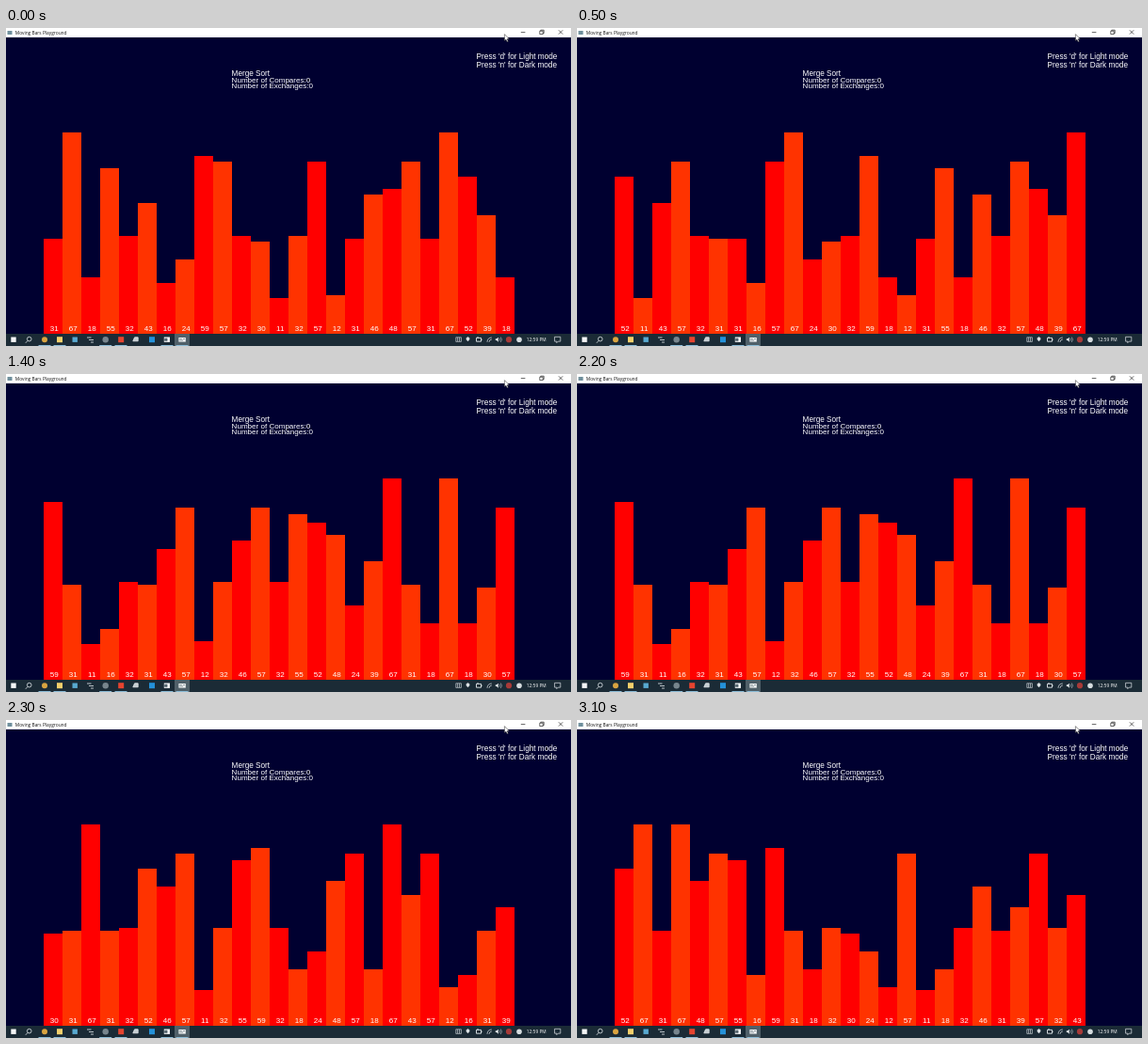
Recreate the animation shown at these times as an HTML page. Size 600 by 338 pixels, loop 3.7 s.

```html
<!DOCTYPE html>
<html lang="en">
<head>
<meta charset="utf-8">
<title>Moving Bars Playground</title>
<style>
  html, body { margin: 0; width: 100%; height: 100%; overflow: hidden; background: #000030; }
  svg { display: block; width: 100vw; height: 100vh; }
  text { white-space: pre; }
  .hud { font: 8.05px "Liberation Sans", Arial, sans-serif; fill: #fff; }
  .ui { font: 4.85px "Open Sans", sans-serif; }
  .line { fill: none; stroke: #e4e9ec; stroke-width: .8; }
</style>
</head>
<body>
<svg id="stage" viewBox="0 0 600 338" preserveAspectRatio="none">
  <rect width="600" height="338" fill="#000030"/>
  <g id="bars"></g>

  <g class="hud">
    <text x="239.6" y="51" font-size="8.2">Merge Sort</text>
    <text x="239.6" y="57.7">Number of Compares:0</text>
    <text x="239.6" y="64">Number of Exchanges:0</text>
    <text x="499.6" y="32.6" style="font-size:8.22px">Press 'd' for Light mode</text>
    <text x="499.6" y="41.8" style="font-size:8.22px">Press 'n' for Dark mode</text>
  </g>

  <!-- title bar -->
  <rect width="600" height="10" fill="#fff"/>
  <rect x="1.5" y="3" width="5" height="4" fill="#6f8f9c"/>
  <text class="ui" x="9.8" y="6.7" fill="#111">Moving Bars Playground</text>
  <g fill="none" stroke="#222" stroke-width=".7">
    <path d="M546.8 4.6h4.6M586.9 2.3l4.3 4.3M591.2 2.3l-4.3 4.3"/>
    <path d="M566.8 3.2h3.4v3.4h-3.4zM567.8 3.2v-1h3.4v3.4h-1"/>
  </g>
  <path d="M529.4 6.6v7l1.6-1.4 1.1 2.5 1.2-.5-1.1-2.5h2.2z" fill="#fff" stroke="#222" stroke-width=".5"/>

  <!-- taskbar -->
  <rect y="325" width="600" height="13" fill="#1b2b36"/>
  <rect x="179" y="325" width="16" height="13" fill="#506069"/>
  <g id="running" fill="#8dbdd8"></g>
  <g id="marks"></g>
  <g class="line">
    <circle cx="24.7" cy="330.6" r="2.3"/>
    <path d="M23 332.4l-2.2 2.4"/>
    <path d="M86 329h4.5M88 331.5h5M90 334h3"/>
    <path d="M134.8 332.8h5.4v-4h-3.6z" fill="#c5cdd1"/>
    <path d="M477.8 328.8h5.6v4.6h-5.6zM479.6 329v4M481.5 329v4" stroke-width=".6"/>
    <path d="M490.5 328v4.5M489 329.2h3v2l-1.5 1.6-1.5-1.6z" stroke-width=".6" fill="#dce2e5"/>
    <path d="M499.5 329.4h5v3.8h-5zM505 330.5v1.6M501 328v1.4" stroke-width=".9"/>
    <path d="M511 333.8a5 5 0 0 1 4.8-4.8M513 333.8a3 3 0 0 1 2.8-2.8" stroke-width=".7"/>
    <path d="M519.8 330.3h1.2l1.8-1.6v5l-1.8-1.6h-1.2z" fill="#e4e9ec" stroke="none"/>
    <path d="M524 329.6q1.5 1.6 0 3.2M525.3 328.5q2.4 2.7 0 5.4" stroke-width=".5"/>
    <path d="M582.6 328.3h6.2v4.8h-2.6l-1.4 1.5v-1.5h-2.2z" stroke-width=".7"/>
  </g>
  <g fill="#f2f4f5">
    <rect x="167.8" y="328.5" width="6.2" height="5.4"/>
    <rect x="183.4" y="329" width="7.4" height="4.6"/>
  </g>
  <path d="M168.5 330h2.6v2.6h-2.6zM184.2 330.5h2.6M188 330.5h2M184.2 332h4" stroke="#53636d" stroke-width=".6" fill="#53636d"/>
  <text class="ui" x="552.8" y="333.1" fill="#fff">12:59 PM</text>
</svg>
<script>
const LOOP = 3700;
const WIDTH = 20, LEFT = 40, FLOOR = 325;
const shuffles = [
  [0, "31 67 18 55 32 43 16 24 59 57 32 30 11 32 57 12 31 46 48 57 31 67 52 39 18"],
  [500, "52 11 43 57 32 31 31 16 57 67 24 30 32 59 18 12 31 55 18 46 32 57 48 39 67"],
  [1400, "59 31 11 16 32 31 43 57 12 32 46 57 32 55 52 48 24 39 67 31 18 67 18 30 57"],
  [2300, "30 31 67 31 32 52 46 57 11 32 55 59 32 18 24 48 57 18 67 43 57 12 16 31 39"],
  [3100, "52 67 31 67 48 57 55 16 59 31 18 32 30 24 12 57 11 18 32 46 31 39 57 32 43"]
];

function add(parent, tag, attrs, text = "") {
  const node = document.createElementNS("http://www.w3.org/2000/svg", tag);
  for (const key in attrs) node.setAttribute(key, attrs[key]);
  node.textContent = text;
  return parent.appendChild(node);
}

const byId = id => document.getElementById(id);

// Plain marks on the taskbar: shape, centre x, size, colour
const marks = [
  ["square", 8, 5.4, "#f4f6f7"], ["circle", 41, 6, "#d9a441"],
  ["square", 57, 6, "#f3cf6b"], ["square", 73.2, 5.4, "#58a9d0"],
  ["circle", 105.7, 6.4, "#77858d"], ["square", 122.2, 6, "#e5442f"],
  ["square", 155, 6, "#2491d8"], ["circle", 534, 6.2, "#a83a38"],
  ["circle", 545, 5.6, "#d5dcdf"]
];
for (const [shape, x, size, fill] of marks) {
  const r = size / 2;
  if (shape === "circle") add(byId("marks"), "circle", { cx: x, cy: 331.2, r, fill });
  else add(byId("marks"), "rect", { x: x - r, y: 331.2 - r, width: size, height: size, fill });
}
for (const x of [41, 57, 105.7, 122, 171, 187]) {
  add(byId("running"), "rect", { x: x - 6.5, y: 337, width: 13, height: 1 });
}

const groups = shuffles.map(([, list]) => {
  const group = add(byId("bars"), "g", { class: "hud", "text-anchor": "middle" });
  list.split(" ").forEach((value, i) => {
    const x = LEFT + i * WIDTH;
    const height = Math.round(value * 3.143 + 3.5);
    add(group, "rect", {
      x, y: FLOOR - height, width: WIDTH, height,
      fill: i % 2 ? "#ff3300" : "#ff0000", "shape-rendering": "crispEdges"
    });
    add(group, "text", { x: x + 11.3, y: 321.7 }, value);
  });
  return group;
});

function draw() {
  const time = performance.now() % LOOP;
  const current = shuffles.findLastIndex(([start]) => start <= time);
  groups.forEach((group, i) => group.style.display = i === current ? "" : "none");
  requestAnimationFrame(draw);
}
draw();
</script>
</body>
</html>
```
